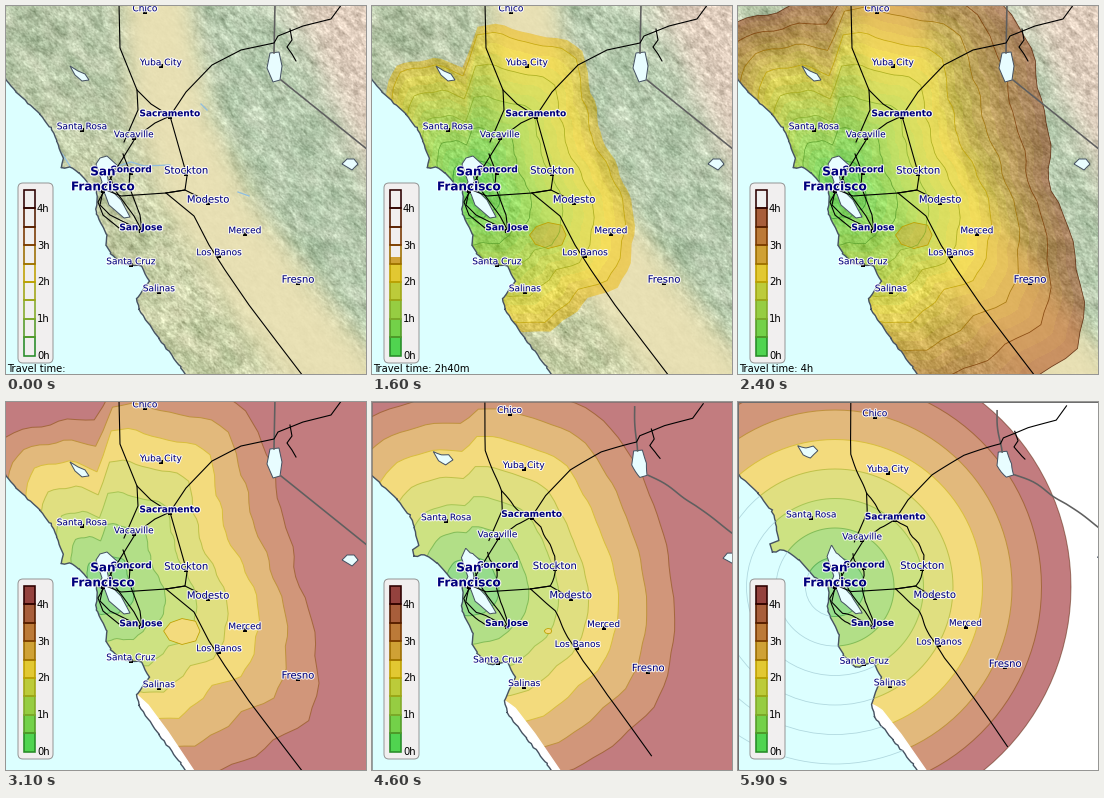
These frames come from a looping animation (360x368 px, 6000 ms). A matplotlib script:

```python
import numpy as np
import matplotlib.pyplot as plt
import matplotlib.patheffects as pe
from matplotlib.animation import FuncAnimation
from matplotlib.patches import Polygon, Rectangle, FancyBboxPatch, Circle
from matplotlib.path import Path

W, H, DPI = 360, 368, 100
PX = 72 / DPI                      # one pixel in points
FRAMES, STEP_MS = 60, 100
HUB = np.array([97.0, 185.0])
RING = 29.5                        # pixels per half hour on the time map
BANDS = 9

plt.rcParams["font.family"] = "DejaVu Sans"
rng = np.random.default_rng(5)


# ---- colour and timing helpers ------------------------------------------
def rgb(*c):
    return np.array(c) / 255


def shade(keys, band):
    """Colour of a half-hour band, from keys two bands apart."""
    at = 2 * np.arange(len(keys))
    return np.stack([np.interp(band, at, c) for c in np.array(keys).T / 255], axis=-1)


FLAT = [(150, 220, 140), (205, 226, 130), (243, 219, 125), (209, 150, 122), (178, 98, 132)]
STRONG = [(80, 212, 80), (150, 205, 66), (226, 200, 50), (188, 122, 56), (148, 66, 62)]
EDGE = [(40, 140, 40), (130, 170, 40), (190, 160, 0), (120, 55, 0), (45, 0, 0)]
SEA, SHORE, GREY = rgb(220, 255, 255), rgb(70, 82, 98), rgb(95, 95, 95)


def ramp(f, start, end):
    return float(np.clip((f - start) / (end - start), 0, 1))


def smooth(u):
    return u * u * (3 - 2 * u)


# ---- travel-time model --------------------------------------------------
# direction in degrees, pixels reached in 2.5 hours, pixels reached in 4 hours
REACH = np.array([(-147, 92, 190), (-128, 124, 205), (-120, 137, 195), (-106, 131, 188),
                  (-92, 114, 195), (-87, 158, 222), (-68, 160, 240), (-51, 172, 255),
                  (-40, 146, 245), (-20, 132, 222), (0, 150, 215), (15, 162, 250),
                  (33, 165, 290), (43, 146, 275), (60, 152, 250), (73, 134, 225),
                  (180, 147, 236)])


def reach(angle, k):
    """Pixels covered in k half hours towards an angle."""
    near, far = (np.interp(angle, REACH[:, 0], REACH[:, i], period=360) for i in (1, 2))
    speed = near / 5 + (far / 8 - near / 5) * np.clip((k - 5) / 3, 0, 1)
    a = np.radians(angle)
    return k * speed * (1 + 0.008 * np.sin(17 * a) + 0.006 * np.sin(31 * a + 1))


def half_hours(dx, dy):
    """Travel time to an offset from the hub, in half hours."""
    angle, r = np.degrees(np.arctan2(dy, dx)), np.hypot(dx, dy)
    k, low = np.zeros_like(r), np.zeros_like(r)
    for step in range(1, 16):
        high = reach(angle, step)
        k += np.clip((r - low) / (high - low), 0, 1)
        low = high
    return k


def time_place(points):
    """Keep the direction, let distance stand for travel time."""
    d = points - HUB
    r = np.maximum(np.hypot(*d.T), 1e-6)
    return HUB + d * (RING * half_hours(*d.T) / r)[:, None]


ANGLES = np.arange(-180, 180, 3)


def around(radius):
    a = np.radians(ANGLES)
    return HUB + np.column_stack([np.cos(a), np.sin(a)]) * np.reshape(radius, (-1, 1))


def contour(k, warp=0.0):
    return around(reach(ANGLES, k) * (1 - warp) + RING * k * warp)


# ---- relief map ---------------------------------------------------------
yy, xx = np.mgrid[0:H, 0:W] + 0.5


def noise(sx, sy):
    """Smooth noise, stretched along the north-west to south-east diagonal."""
    fy, fx = np.fft.fftfreq(H)[:, None], np.fft.fftfreq(W)[None, :]
    u, v = (fx + fy) / 2 ** 0.5, (fx - fy) / 2 ** 0.5
    keep = np.exp(-2 * np.pi ** 2 * ((u * sx) ** 2 + (v * sy) ** 2))
    n = np.fft.ifft2(np.fft.fft2(rng.standard_normal((H, W))) * keep).real
    return (n / n.std())[..., None]


def sigmoid(d, width):
    return (1 / (1 + np.exp(-d / width)))[..., None]


def relief():
    axis = np.interp(yy, [0, 110, 200, 300, H], [150, 165, 203, 272, 325])
    half = 36 + 0.06 * yy
    valley = np.exp(-((xx - axis) / half) ** 4)[..., None]
    sierra = sigmoid(xx - axis - half, 10)
    desert = sigmoid(xx - 285 - 0.45 * yy, 9)
    north = sigmoid(130 - yy, 30) * (1 - sierra)
    land = rgb(198, 206, 166) - sierra * rgb(18, 6, -6) - north * rgb(16, 8, -2)
    land = land + rgb(7, 5, 6) * noise(7, 4)
    land = land * (1 - desert) + rgb(224, 206, 190) * desert
    land = land * (1 - valley) + rgb(232, 224, 180) * valley
    bumps = 0.03 * noise(2.2, 0.9) + 0.028 * noise(0.7, 0.5) + 0.018 * noise(4, 2)
    return np.clip(land + bumps * (1.12 - valley), 0, 1)


terrain = relief()
steps = np.floor(3 * half_hours(xx - HUB[0], yy - HUB[1])) / 3
tinted = np.clip((terrain - 0.75) * 0.7 + 0.26, 0, 1) + shade(STRONG, steps - 1 / 3) * 0.66
tinted = np.clip(tinted, 0, 1)

# ---- stage --------------------------------------------------------------
fig = plt.figure(figsize=(W / DPI, H / DPI), dpi=DPI)
ax = fig.add_axes([0, 0, 1, 1])
ax.set_xlim(0, W)
ax.set_ylim(H, 0)
ax.axis("off")

picture = dict(extent=(0, W, H, 0), interpolation="nearest", aspect="auto")
relief_im = ax.imshow(terrain, zorder=2, **picture)
tint_im = ax.imshow(tinted, zorder=3, **picture)

RED = shade(FLAT, 7)
backdrop = ax.add_patch(Rectangle((0, 0), W, H, fc=RED, zorder=0))
rings, trails = {}, {}
for k in range(8, 0, -1):
    fill, edge = shade(FLAT, k - 1), shade(EDGE, k - 1)
    rings[k] = ax.add_patch(Polygon(contour(k), fc=fill, ec=0.5 * (fill + edge),
                                    lw=PX, zorder=1))
    trails[k] = ax.add_patch(Polygon(contour(k), fill=False, ec=edge, lw=0.8 * PX,
                                     zorder=3.5))

# ---- things that travel from map place to time place --------------------
moving = []


def trace(points, gap=4):
    """Extra points along a path, so that it can bend."""
    p = np.array(points, float)
    run = np.r_[0, np.cumsum(np.hypot(*np.diff(p, axis=0).T))]
    at = np.union1d(run, np.arange(0, run[-1], gap))
    return np.column_stack([np.interp(at, run, c) for c in p.T])


def travel(put, points):
    moving.append((put, points, time_place(points)))


def shape(points, **style):
    p = trace(points + points[:1])
    art = ax.add_patch(Polygon(p, **style))
    travel(art.set_xy, p)


def line(points, color="black", lw=1.1, z=6):
    art, = ax.plot([], [], color=color, lw=lw * PX, zorder=z, solid_joinstyle="round")
    travel(lambda p: art.set_data(*p.T), trace(points))


# Strip of coast that no road reaches
shape([(131, 293), (142, 303), (162, 330), (190, 372), (178, 372), (153, 333), (133, 303)],
      fc="white", ec="white", zorder=1.6)

# Slow hills east of the bay
turn = np.linspace(0, 2 * np.pi, 9)[:-1]
pocket = np.column_stack([np.cos(turn) * 18, np.sin(turn) * 13])
pocket = pocket * rng.uniform(0.85, 1.1, (8, 1))
POCKET_AT = np.array([176, 229])
pocket_art = ax.add_patch(Polygon(pocket, fc=shade(FLAT, 4), ec=shade(EDGE, 4), lw=0.8 * PX,
                                  zorder=1.5))
pocket_tint = ax.add_patch(Polygon(pocket + POCKET_AT, fc=(*shade(STRONG, 5), 0.4),
                                   ec=shade(EDGE, 4), lw=0.8 * PX, zorder=3.4))

coast = trace([(-12, 58), (0, 73), (10, 86), (24, 99), (34, 108), (45, 122), (51, 135),
               (57, 152), (55, 162), (64, 161), (73, 167), (83, 178), (91, 184), (90, 208),
               (101, 229), (100, 239), (105, 248), (115, 257), (135, 260), (143, 275),
               (131, 293), (133, 303), (153, 333), (175, 361), (198, 395)])
coast += rng.uniform(-0.6, 0.6, coast.shape)
sea = ax.add_patch(Polygon(coast, fc=SEA, ec=SHORE, lw=1.4 * PX, zorder=4))
travel(lambda p: sea.set_xy(np.vstack([p, (-60, 420), (-60, 40)])), coast)

ripples = [ax.add_patch(Circle(HUB, RING * k, fill=False, ec=rgb(175, 215, 222),
                               lw=0.8 * PX, zorder=4.5)) for k in range(1, 9)]
for r in ripples:
    r.set_clip_path(sea)

water = dict(fc=rgb(232, 253, 255), ec=SHORE, lw=PX, zorder=5)
shape([(91, 184), (96, 176), (90, 158), (94, 152), (101, 150), (112, 160), (101, 168),
       (104, 183), (115, 194), (124, 211), (118, 212), (103, 199), (99, 188)], **water)
shape([(64, 60), (72, 65), (79, 68), (83, 74), (76, 75), (69, 69)], **water)
shape([(264, 47), (273, 46), (276, 60), (274, 74), (267, 76), (261, 62)], **water)
shape([(336, 158), (341, 153), (348, 153), (352, 158), (346, 164)], **water)

RIVERS = [[(112, 160), (125, 156), (138, 160), (164, 159)], [(45, 135), (57, 149), (64, 160)],
          [(195, 98), (201, 104)], [(232, 186), (243, 190)]]
rivers = [ax.plot(*zip(*p), color=rgb(145, 190, 222), lw=1.3 * PX, zorder=2.5)[0]
          for p in RIVERS]

line([(269, -2), (268, 47)], GREY, 1.6, 5.5)
line([(275, 74), (362, 144)], GREY, 1.6, 5.5)

ROADS = [
    [(113, -2), (114, 42), (131, 84), (145, 98), (164, 110)],
    [(131, 84), (132, 104), (118, 136)],
    [(164, 110), (149, 117), (130, 131), (112, 160), (97, 185)],
    [(164, 110), (180, 86), (206, 59), (235, 44), (268, 37), (272, 30), (297, 20),
     (325, 13), (336, -2)],
    [(284, 23), (286, 34), (281, 41), (286, 48), (290, 55)],
    [(164, 110), (181, 170), (179, 184), (160, 187)],
    [(100, 184), (115, 190), (160, 187), (179, 184), (203, 196)],
    [(160, 187), (188, 210), (203, 239), (219, 264), (243, 299), (271, 336), (297, 370)],
    [(117, 148), (124, 166), (123, 180), (134, 209), (136, 225)],
    [(97, 185), (94, 199), (104, 209), (136, 225)],
    [(97, 187), (92, 196), (97, 209), (113, 222), (136, 225)],
    [(104, 170), (109, 184), (128, 210), (136, 225)],
]
for road in ROADS:
    line(road)

# ---- cities -------------------------------------------------------------
NAVY = rgb(0, 0, 125)
HALO = [pe.withStroke(linewidth=2.2 * PX, foreground=(1, 1, 1, 0.85))]
TOWNS = [("Chico", 139, 6), ("Yuba City", 155, 60), ("Santa Rosa", 76, 124),
         ("Vacaville", 128, 132), ("Merced", 239, 228), ("Los Banos", 213, 250),
         ("Santa Cruz", 125, 259), ("Salinas", 153, 286)]
LARGE_TOWNS = [("Stockton", 180, 168), ("Modesto", 202, 197), ("Fresno", 292, 277)]
CENTRES = [("Sacramento", 164, 111), ("Concord", 125, 167), ("San Jose", 135, 225)]


def city(name, x, y, size=9, weight="normal", rise=4):
    text = ax.text(x, y, name, size=size * PX, weight=weight, color=NAVY, ha="center",
                   path_effects=HALO, zorder=8)
    dot, = ax.plot([], [], "s", ms=(5 if weight == "bold" else 3.5) * PX, mew=0,
                   color="black", zorder=7)

    def place(p):
        text.set_position((p[0, 0], p[0, 1] - rise + 0.36 * size))
        dot.set_data(p[:, 0], p[:, 1])

    travel(place, np.array([(x, y)], float))


for town in TOWNS:
    city(*town)
for town in LARGE_TOWNS:
    city(*town, size=10)
for town in CENTRES:
    city(*town, weight="bold")
city("San", *HUB, 12, "bold", rise=20)
city("Francisco", *HUB, 12, "bold", rise=5)

# ---- legend -------------------------------------------------------------
ax.add_patch(FancyBboxPatch((16, 181), 27, 172, boxstyle="round,pad=4,rounding_size=5",
                            fc=rgb(241, 239, 239), ec=rgb(150, 150, 150), lw=PX, zorder=9))
CELL, BASE = 18.4, 349.5
bars = []
for i in range(BANDS):
    foot = BASE - CELL * i
    bars.append(ax.add_patch(Rectangle((18, foot), 11, 0, fc=shade(STRONG, i), zorder=9.1)))
    ax.add_patch(Rectangle((18, foot), 11, -CELL, fill=False, ec=shade(EDGE, i),
                           lw=1.6 * PX, zorder=9.2))
for h in range(5):
    ax.text(31, BASE - 2 * CELL * h + 3.5, f"{h}h", size=10 * PX, zorder=10)
clock = ax.text(1, 366, "", size=10 * PX, zorder=10)
frame = ax.add_patch(Rectangle((0, 0), W, H, fill=False, ec=rgb(110, 110, 110), lw=PX,
                               zorder=11))


def clock_text(minutes):
    h, m = divmod(minutes, 60)
    return "Travel time: " + (f"{h}h" if h else "") + (f"{m}m" if m else "")


def draw(f):
    minutes = min(10 * f, 30 * BANDS)
    relief_left = 1 - ramp(f, 27, 31)
    warp = smooth(ramp(f, 30, 57))
    clear = ramp(f, 52, 56)

    # isochrones spread over the relief, which then fades to flat colour
    for art in [relief_im, tint_im, *rivers]:
        art.set_alpha(relief_left)
    tint_im.set_visible(minutes > 0)
    tint_im.set_clip_path(Path(contour(minutes / 30)), transform=ax.transData)
    for k, trail in trails.items():
        trail.set_alpha(0.8 * relief_left if minutes >= 30 * k else 0)
    pocket_tint.set_visible(minutes >= 130 and relief_left == 1)

    # the map bends until distance equals time
    for put, a, b in moving:
        put(a + (b - a) * warp)
    for k, ring in rings.items():
        ring.set_xy(contour(k, warp))
    pocket_art.set_xy(POCKET_AT + pocket * max(0, 1 - 1.25 * warp))

    # everything past the last ring clears, ripples mark the sea
    backdrop.set_facecolor(RED * (1 - clear) + clear)
    rings[8].set_edgecolor((*shade(EDGE, 7), 0.5 * clear))
    for r in ripples:
        r.set_alpha(ramp(f, 56, 59))
    frame.set_alpha(warp)

    for i, bar in enumerate(bars):
        bar.set_height(-CELL * np.clip(minutes / 30 - i, 0, 1))
    clock.set_text(clock_text(minutes) if f < 28 else "")
    return []


anim = FuncAnimation(fig, draw, frames=FRAMES, interval=STEP_MS, repeat=True,
                     repeat_delay=0, init_func=lambda: draw(0))
plt.show()
```
